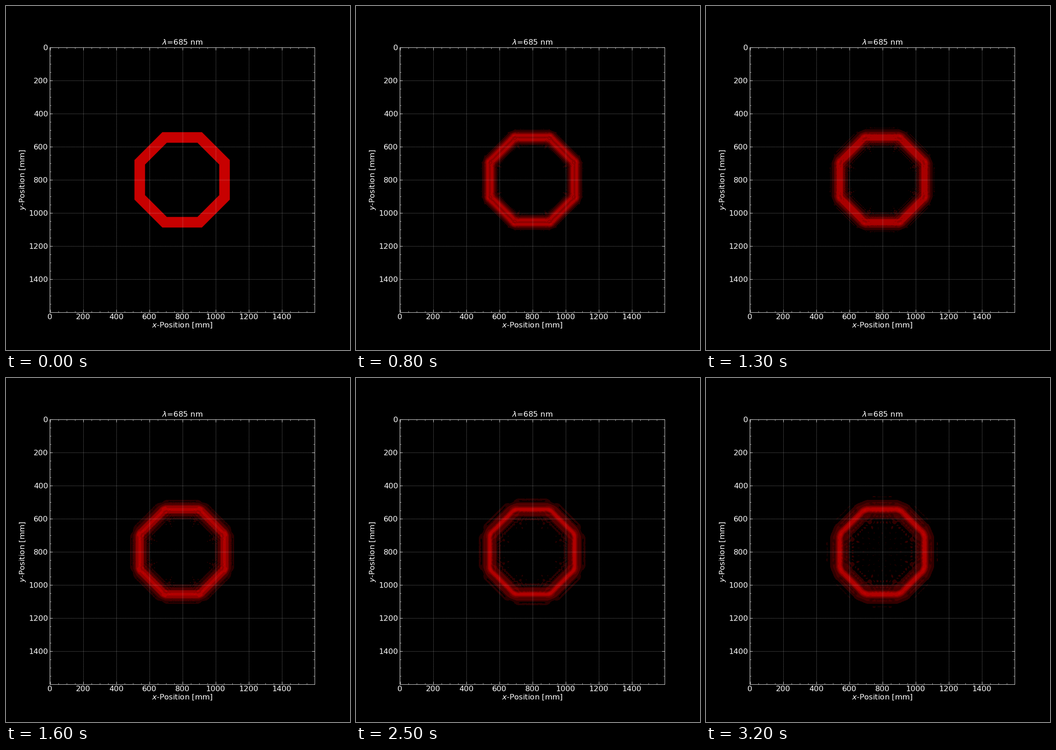
A matplotlib script for the animation above (3.3 s loop, 748x748 px).

```python
import numpy as np
import matplotlib.pyplot as plt
from matplotlib.animation import FuncAnimation
from matplotlib.ticker import MultipleLocator

STAGE = 748          # px
VIEW = 576           # px, side of the plot area
SPAN = 1600          # mm, sampled once per mm
FRAMES, INTERVAL = 33, 100
OUTER, INNER = 288, 224      # octagon apothems, mm
LAMBDA_Z = 64        # wavelength times distance per step, mm^2
PEAK = 199           # red of 685 nm light
STEP = 32            # width of one shade band

# The pattern is mirror-symmetric, so only one quadrant is computed.
HALF = SPAN // 2
pos = np.arange(HALF) + 0.5
x, y = np.meshgrid(pos[:OUTER], pos[:OUTER])
dist = np.maximum(np.maximum(x, y), (x + y) / np.sqrt(2))
RING = ((dist < OUTER) & (dist > INNER)).astype(float)

FREQ = np.fft.fftfreq(SPAN)
ROW = np.arange(HALF)[:, None]
COL = np.arange(OUTER)[None, :]


def downsampler():
    """Hann-weighted reduction of a quadrant to screen pixels."""
    scale = SPAN / VIEW
    centre = (np.arange(VIEW // 2)[:, None] + 0.5) * scale

    def hann(d):
        return np.where(np.abs(d) < scale, 1 + np.cos(np.pi * d / scale), 0)

    w = hann(centre - pos) + hann(centre + pos)
    return w / w.sum(axis=1, keepdims=True)


SHRINK = downsampler()


def amplitude(step):
    """Fresnel-propagated amplitude, scaled to a maximum of 1."""
    kernel = np.fft.ifft(np.exp(-1j * np.pi * LAMBDA_Z * step * FREQ ** 2))
    spread = kernel[(ROW - COL) % SPAN] + kernel[(ROW + COL + 1) % SPAN]
    field = np.abs(spread @ RING @ spread.T)
    quad = SHRINK @ (field / field.max()) @ SHRINK.T
    right = np.vstack([quad[::-1], quad])
    return np.hstack([right[:, ::-1], right])


def shade(step):
    """Red image in flat bands, each band in its mean tone."""
    red = PEAK * amplitude(step)
    band = (red // STEP).astype(int)
    flat = band.ravel()
    count = np.bincount(flat)
    tone = np.bincount(flat, red.ravel()) / np.maximum(count, 1)
    tone[0] = 0
    image = np.zeros((VIEW, VIEW, 3), np.uint8)
    image[..., 0] = np.round(tone[band])
    return image


plt.style.use("dark_background")
plt.rcParams.update({
    "font.family": "DejaVu Sans",
    "font.size": 16,
    "axes.titlesize": "medium",
    "axes.labelsize": "medium",
})

SIZE = 10            # inches
fig, ax = plt.subplots(figsize=(SIZE, SIZE), dpi=STAGE / SIZE,
                       facecolor="black")
picture = ax.imshow(shade(0), interpolation="nearest",
                    extent=(-0.5, SPAN - 0.5, SPAN - 0.5, -0.5))

for axis in (ax.xaxis, ax.yaxis):
    axis.set_major_locator(MultipleLocator(200))
    axis.set_minor_locator(MultipleLocator(50))
ax.tick_params(which="both", direction="in", top=True, right=True)
ax.tick_params(which="major", length=6)
ax.tick_params(which="minor", length=3)
ax.tick_params(axis="x", pad=3)
ax.grid(True, color="white", alpha=0.6, linestyle="--", linewidth=0.5)
ax.set_title(r"$\lambda$=685 nm", pad=6)
ax.set_xlabel("$x$-Position [mm]", labelpad=1.5)
ax.set_ylabel("$y$-Position [mm]", labelpad=3)


def update(step):
    picture.set_data(shade(step))
    return [picture]


anim = FuncAnimation(fig, update, frames=FRAMES, interval=INTERVAL,
                     repeat=True, repeat_delay=0, blit=False)
plt.show()
```
